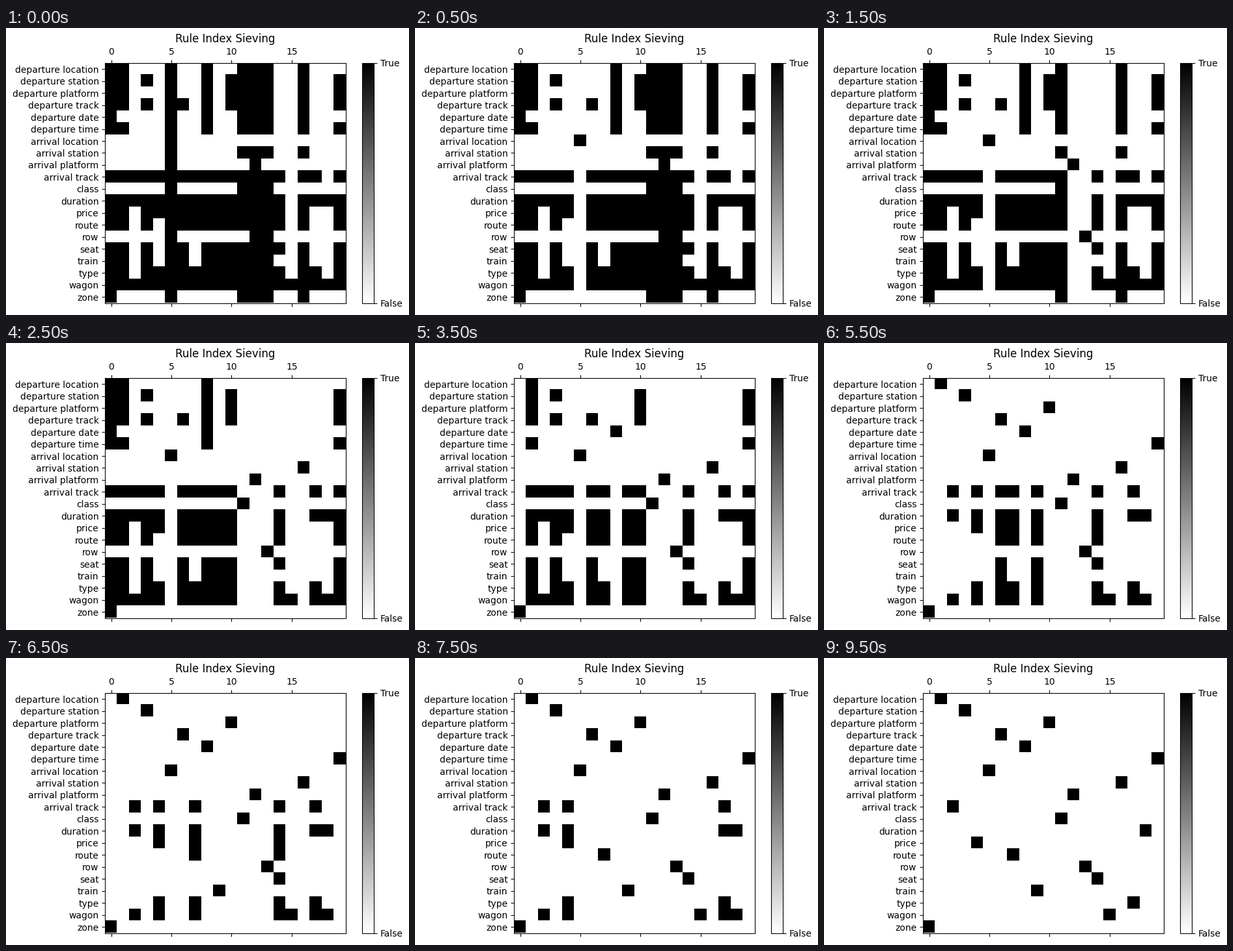
Write a matplotlib script that moves like this. It is 619 by 442 pixels and loops after 10 s.

```python
import numpy as np
import matplotlib.pyplot as plt
from matplotlib.animation import FuncAnimation

WIDTH, HEIGHT, DPI = 619, 442, 100
SIDE = 369.6          # matrix side in pixels
BAR_OFFSET = 394.4    # from the matrix's left edge to the colour bar
BAR_WIDTH = SIDE / 20
MARGIN = 10

RULES = (
    ["departure " + word for word in
     ("location", "station", "platform", "track", "date", "time")]
    + ["arrival " + word for word in
       ("location", "station", "platform", "track")]
    + ["class", "duration", "price", "route", "row",
       "seat", "train", "type", "wagon", "zone"]
)
COUNT = len(RULES)

# Order in which fields are settled, and the rule each one ends up with.
FIELDS = [5, 12, 13, 11, 16, 0, 8, 1, 19, 10, 3, 6, 9, 14, 7, 4, 17, 2, 18, 15]
MATCHES = [6, 8, 14, 10, 7, 19, 4, 0, 5, 2, 1, 3, 16, 15, 13, 12, 17, 9, 11, 18]


def candidates(settled):
    """Rule/field matrix once the given number of fields is settled."""
    matrix = np.zeros((COUNT, COUNT))
    for step, field in enumerate(FIELDS):
        rows = MATCHES[step] if step < settled else MATCHES[step:]
        matrix[rows, field] = 1
    return matrix


def place(left, bottom):
    """Put the matrix at a pixel position, with the colour bar beside it."""
    for axes, x, width in ((ax, left, SIDE), (bar_ax, left + BAR_OFFSET, BAR_WIDTH)):
        axes.set_position([x / WIDTH, bottom / HEIGHT, width / WIDTH, SIDE / HEIGHT])


plt.rcParams["font.family"] = "DejaVu Sans"
fig = plt.figure(figsize=(WIDTH / DPI, HEIGHT / DPI), dpi=DPI)
ax = fig.add_axes([0, 0, 1, 1])
bar_ax = fig.add_axes([0.9, 0, 0.1, 1])
left, bottom = 152, 18
place(left, bottom)

image = ax.matshow(candidates(0), cmap="binary", vmin=0, vmax=1)
ax.set_title("Rule Index Sieving")
ax.set_yticks(range(COUNT), labels=RULES)
bar = fig.colorbar(image, cax=bar_ax)
bar.set_ticks([0, 1], labels=["False", "True"])

# Shift everything so the labels keep an even margin at the left and bottom.
fig.draw_without_rendering()
extent = fig.get_tightbbox()
place(left + MARGIN - extent.x0 * DPI, bottom + MARGIN - extent.y0 * DPI)


def update(frame):
    image.set_data(candidates(frame))
    return [image]


anim = FuncAnimation(fig, update, frames=COUNT, interval=500, repeat=True)
plt.show()
```
